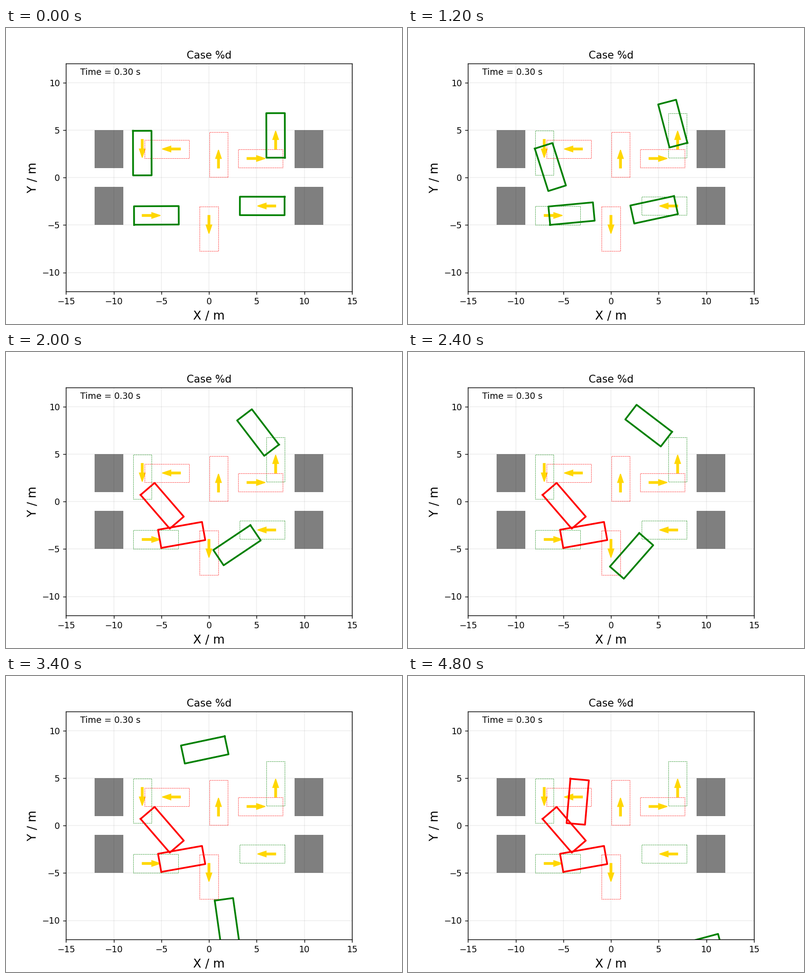
A matplotlib script that plays this animation: 800 px wide and 600 px high, repeating every 4900 ms.

```python
import numpy as np
import matplotlib.pyplot as plt
from matplotlib.animation import FuncAnimation

DT = 0.1
FRAMES = 49
WHEELBASE, FRONT, REAR, WIDTH = 2.8, 0.96, 0.929, 1.942
SHARP = np.tan(0.5) / WHEELBASE  # curvature at full steering lock

UP, DOWN, LEFT, RIGHT = np.pi / 2, -np.pi / 2, np.pi, 0.0

# start pose, initial speed, acceleration, curvature, step of collision
CARS = [
    ((-7, -4, RIGHT), 0.61, 0.73, 0.0643, 20),
    ((-7, 4, DOWN), -0.02, 1.755, SHARP, 20),
    ((7, -3, LEFT), -0.218, 1.512, SHARP, None),
    ((7, 3, UP), -0.005, 1.451, SHARP, 46),
]
GOALS = [(4, 2, RIGHT), (0, -4, DOWN), (-3, 3, LEFT), (1, 1, UP)]
OBSTACLES = [(-12, 1), (-12, -5), (9, 1), (9, -5)]


def outline(x, y, theta):
    """Closed car outline around the rear axle centre."""
    lon = np.array([-REAR, WHEELBASE + FRONT, WHEELBASE + FRONT, -REAR, -REAR])
    lat = np.array([-1, -1, 1, 1, -1]) * WIDTH / 2
    c, s = np.cos(theta), np.sin(theta)
    return x + lon * c - lat * s, y + lon * s + lat * c


def drive(pose, v, accel, curvature, crash):
    """Pose after every step; the car stays put once it has crashed."""
    x, y, theta = pose
    path = []
    for step in range(1, FRAMES + 1):
        if crash is None or step <= crash:
            v += accel * DT
            x += v * np.cos(theta) * DT
            y += v * np.sin(theta) * DT
            theta += v * curvature * DT
        path.append((x, y, theta))
    return path


def mark_pose(pose, color):
    x, y, theta = pose
    ax.plot(*outline(*pose), "--", color=color, linewidth=0.4)
    ax.arrow(x, y, np.cos(theta), np.sin(theta), width=0.2, color="gold")


fig, ax = plt.subplots(figsize=(6.4, 4.8), dpi=125)
ax.set_xlim(-15, 15)
ax.set_ylim(-12, 12)
ax.set_aspect("equal", adjustable="box")
ax.set_axisbelow(True)
ax.grid(linewidth=0.2)
ax.set_title("Case %d")
ax.set_xlabel("X / m", fontsize=14)
ax.set_ylabel("Y / m", fontsize=14)
ax.text(0.05, 0.95, "Time = 0.30 s", transform=ax.transAxes)

for x, y in OBSTACLES:
    ax.fill([x, x + 3, x + 3, x], [y, y, y + 4, y + 4], facecolor="k", alpha=0.5)
for car in CARS:
    mark_pose(car[0], "green")
for goal in GOALS:
    mark_pose(goal, "red")

paths = [drive(*car) for car in CARS]
bodies = [ax.plot([], [], color="green", linewidth=2)[0] for _ in CARS]


def update(i):
    for body, path, car in zip(bodies, paths, CARS):
        crash = car[-1]
        body.set_data(*outline(*path[i]))
        body.set_color("red" if crash and i + 1 >= crash else "green")
    return bodies


anim = FuncAnimation(fig, update, frames=FRAMES, interval=100,
                     repeat=True, repeat_delay=0)
plt.show()
```
